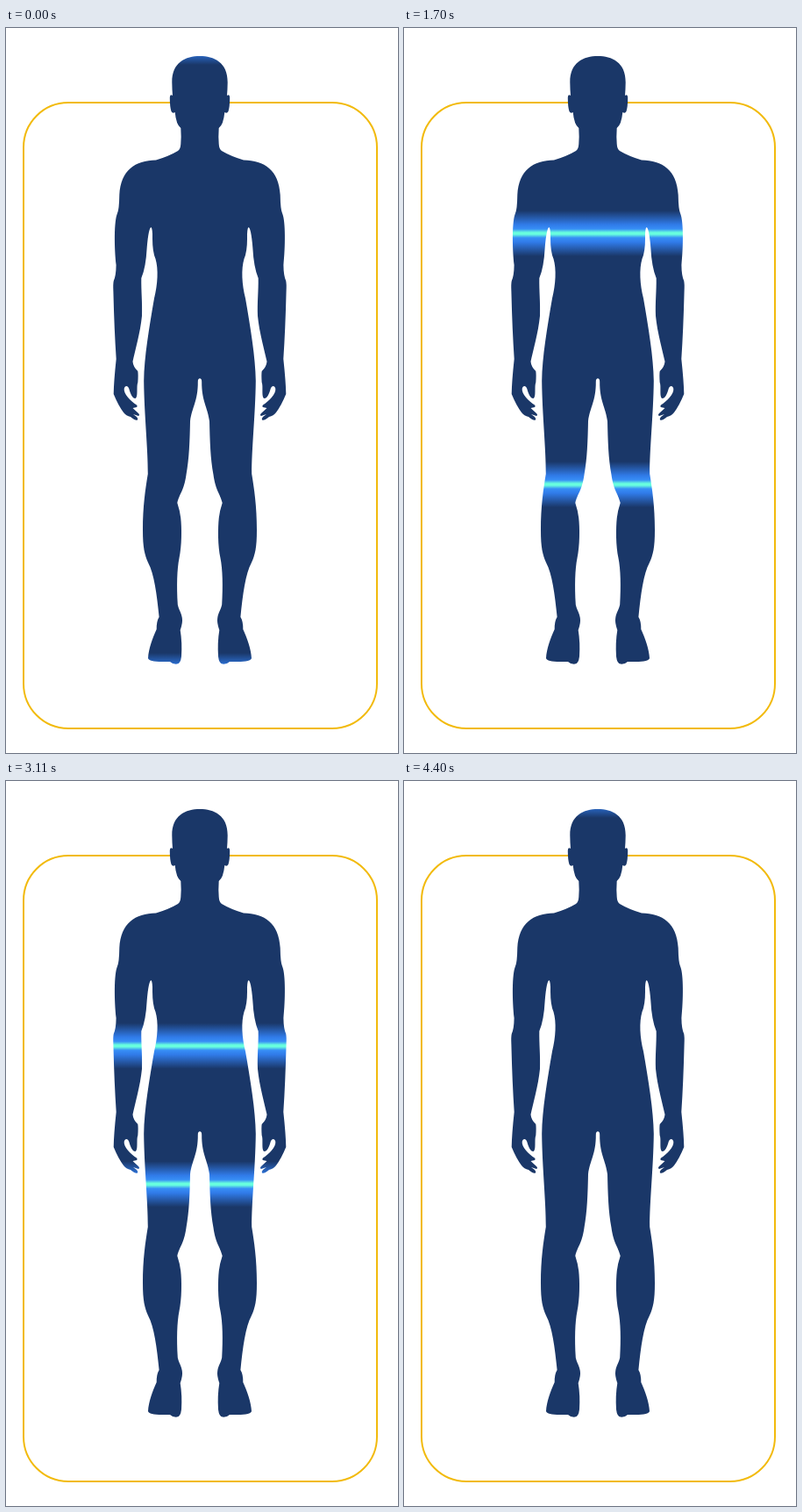
Animation, 447 px wide and 826 px high, one loop 4.57 s. Source, as an HTML page with a canvas:

```html
<!DOCTYPE html>
<html lang="en">
<head>
<meta charset="utf-8">
<title>Body scan</title>
<style>
  html, body { margin: 0; width: 100%; height: 100%; overflow: hidden; background: #fff; }
  canvas { display: block; }
</style>
</head>
<body>
<canvas id="stage" width="447" height="826"></canvas>
<script>
const ctx = document.getElementById('stage').getContext('2d');

const LOOP = 4570, START = 440, TURN = 2270, END = 4400, STEP = 30;
const AXIS = 221, REACH = 26;
const NAVY = '#1a3768', GOLD = '#f2ba0c';

// Left half of the figure, from the crown down to the crotch
const head = `M221 32 C205 32 189 39 189.3 62 Q189.4 70 190 77 Q187 75 186.8 79
  Q186.8 90 188.5 95 Q190 98 192.7 96 Q194 110 199.3 114`;
const shoulder = `Q200 124 199.3 132 Q199 138 196 140 Q186 146 171 150.5
  C147 151 131 162 129.3 190 Q129 207 127 211`;
const outerArm = `C123 220 123.5 250 125.6 270 Q125.5 282 122.8 288 Q122 291 122.4 300
  Q123.5 345 125.7 377 Q123 402 122.7 417`;
const hand = `Q128 430 134 438 Q137 442 142 443 Q147 447.5 150 446.5 Q151 445 149 443
  L145 440 L151 442 Q153 441 151 439 L144.5 433 L149 432 Q150.5 431 149 429.5
  C142 425 134 417 134.7 411 C135.5 407 139 407 140.3 411 C142 417 144 422 147.5 422
  C151 421 148.5 408 150.3 404 Q151 395 150.3 391 Q145 386 144.5 380`;
const innerArm = `C147 368 153 348 155 328 C155.6 312 154 300 154.3 285
  Q159.5 273 160.7 250 Q162.5 228 165.5 227`;
const torso = `Q167.3 229 167 240 Q167 255 170.5 263 C174 275 173 292 169 308
  C163.5 340 157.5 375 157.2 402`;
const outerLeg = `C157.6 440 162 480 161.8 508 C159 525 156 545 156 572
  C156 592 158 600 162 609 C169 622 172 645 174.6 671 Q171.5 676 171.7 685
  C167 695 162.5 708 162 718`;
const innerLeg = `Q163 722 178 722 L187 722 Q190 725 195 724.6 Q199 724.5 200 716
  Q201 700 198.7 686 Q201.8 677 200.8 672 C200 666 197 663 195.8 657
  C194.5 635 195 617 197.5 604 C200.5 590 200.5 570 199.2 558 Q198.3 550 195.3 541
  C198 530 203 527 205.5 509 C209 490 209.5 470 210 448 C212 432 219 425 218.8 403
  Q218.8 399.3 221 399.3 Z`;

const half = new Path2D([head, shoulder, outerArm, hand, innerArm, torso, outerLeg, innerLeg].join(' '));
const body = new Path2D(half);
body.addPath(half, new DOMMatrix([-1, 0, 0, 1, 2 * AXIS, 0]));

const mix = (a, b, k) => a + (b - a) * k;

// Straight travel to the turning point, then back
function travel(t, from, turn, to) {
  return t < TURN
    ? mix(from, turn, (t - START) / (TURN - START))
    : mix(turn, to, (t - TURN) / (END - TURN));
}

function drawBand(y) {
  const glow = ctx.createLinearGradient(0, y - REACH, 0, y + REACH);
  const stops = [
    [26, 'rgba(50,128,242,0)'],
    [10, 'rgba(50,128,242,0.93)'],
    [5, 'rgb(55,142,246)'],
    [1, 'rgb(104,255,222)']
  ];
  for (const [d, color] of stops) {
    glow.addColorStop(0.5 - d / (2 * REACH), color);
    glow.addColorStop(0.5 + d / (2 * REACH), color);
  }
  ctx.fillStyle = glow;
  ctx.fillRect(0, y - REACH, 447, 2 * REACH);
}

function draw(ms) {
  const steps = Math.max(0, Math.floor((ms - START) / STEP));
  const t = Math.min(END, START + steps * STEP);

  ctx.globalCompositeOperation = 'source-over';
  ctx.clearRect(0, 0, 447, 826);
  ctx.fillStyle = NAVY;
  ctx.fill(body);

  ctx.globalCompositeOperation = 'source-atop';
  drawBand(travel(t, 16, 748, 16));
  drawBand(travel(t, 738, 6, 756));

  // The frame sits behind the figure
  ctx.globalCompositeOperation = 'destination-over';
  ctx.strokeStyle = GOLD;
  ctx.lineWidth = 2;
  ctx.beginPath();
  ctx.roundRect(20, 85, 403, 713, 51);
  ctx.stroke();
}

const begin = performance.now();
function tick() {
  draw((performance.now() - begin) % LOOP);
  requestAnimationFrame(tick);
}
tick();
</script>
</body>
</html>
```
